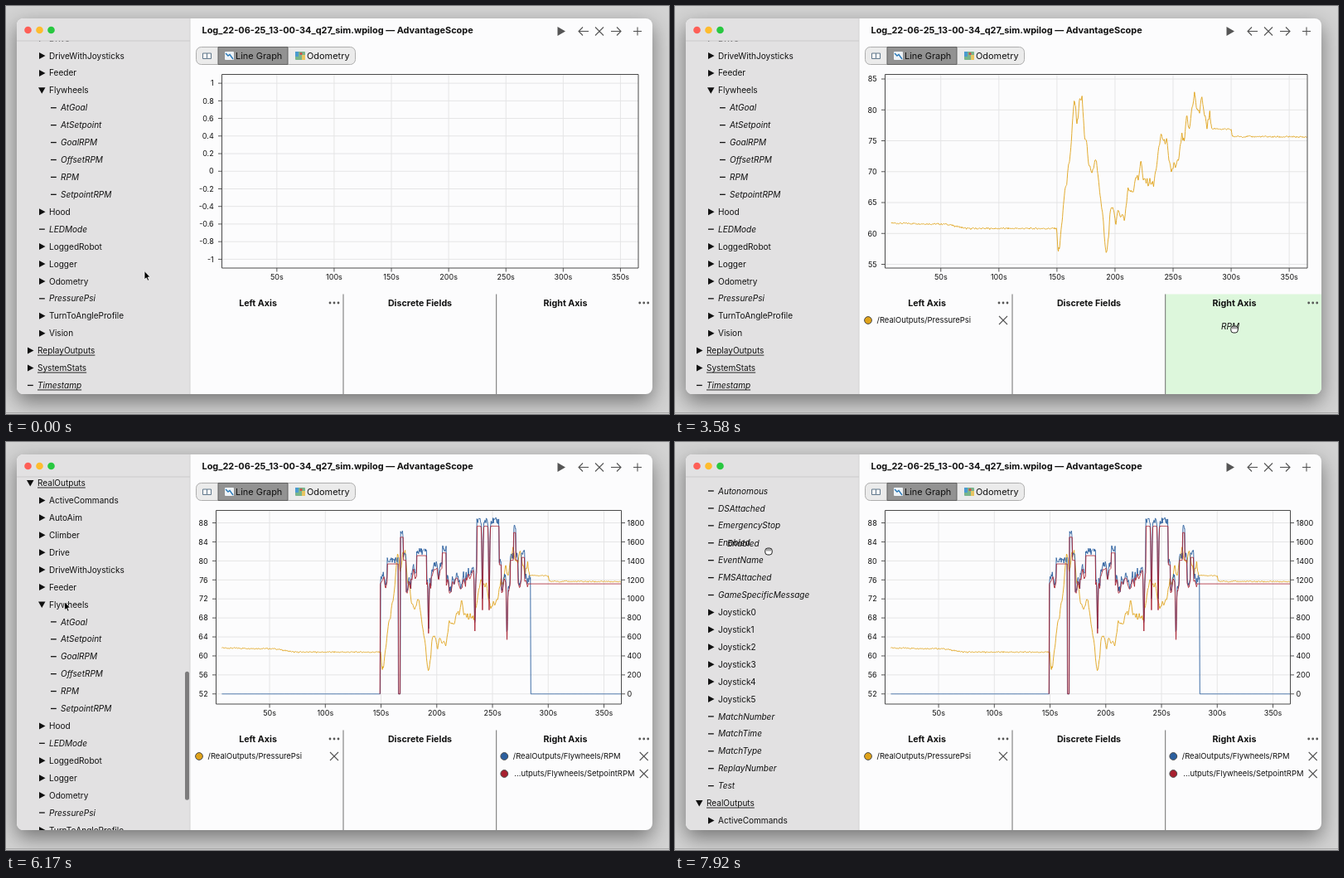
Recreate the animation shown at these times as an HTML page with a canvas. Size 800 px wide and 492 px high, loop 8000 ms.

```html
<!DOCTYPE html>
<html lang="en">
<head>
<meta charset="utf-8">
<title>Log viewer</title>
<style>
  html, body { margin: 0; height: 100%; overflow: hidden; background: #d3d3d3; }
  canvas { display: block; }
</style>
</head>
<body>
<canvas id="stage" width="800" height="492"></canvas>
<script>
const ctx = document.getElementById('stage').getContext('2d');
const LOOP = 8000, ROW = 20.92;
const YELLOW = '#e0a31a', BLUE = '#2b5f9f', RED = '#a8202f', INK = '#111', GRAY = '#555';

// Sidebar entries: indent level, then > closed, v open, - leaf
const tree = `1-Autonomous 1-DSAttached 1-EmergencyStop 1-Enabled 1-EventName 1-FMSAttached
1-GameSpecificMessage 1>Joystick0 1>Joystick1 1>Joystick2 1>Joystick3 1>Joystick4 1>Joystick5
1-MatchNumber 1-MatchTime 1-MatchType 1-ReplayNumber 1-Test 0vRealOutputs 1>ActiveCommands
1>AutoAim 1>Climber 1>Drive 1>DriveWithJoysticks 1>Feeder 1vFlywheels 2-AtGoal 2-AtSetpoint
2-GoalRPM 2-OffsetRPM 2-RPM 2-SetpointRPM 1>Hood 1-LEDMode 1>LoggedRobot 1>Logger 1>Odometry
1-PressurePsi 1>TurnToAngleProfile 1>Vision 0>ReplayOutputs 0>SystemStats 0-Timestamp`
  .split(/\s+/).map(s => ({ level: +s[0], kind: s[1], name: s.slice(2) }));

// Pointer moves; a move with a drag carries that entry until it is dropped
const moves = [
  { from: 420, to: 1000, x: 84, y: 352 },
  { from: 1220, to: 1820, x: 305, y: 386, drag: 'PressurePsi', drop: 1960 },
  { from: 2040, to: 2400, x: 86, y: 217 },
  { from: 2480, to: 2650, x: 81, y: 208.4 },
  { from: 2880, to: 3500, x: 674, y: 388, drag: 'RPM', drop: 3660 },
  { from: 3720, to: 4300, x: 89, y: 224 },
  { from: 4540, to: 5240, x: 670, y: 393, drag: 'SetpointRPM', drop: 5410, arrow: true },
  { from: 5430, to: 5860, x: 70.5, y: 193 },
  { from: 7050, to: 7420, x: 101, y: 129.6 },
  { from: 7620, to: 7900, x: 112, y: 130, drag: 'Enabled', drop: LOOP }];

function ramp(t, from, to) {
  const u = Math.min(1, Math.max(0, (t - from) / (to - from)));
  return u * u * (3 - 2 * u);
}
function cursorAt(t) {
  let x = 167, y = 320;
  for (const m of moves) {
    const u = ramp(t, m.from, m.to);
    x += (m.x - x) * u;
    y += (m.y - y) * u;
  }
  return [x, y];
}
const scrollAt = t => -421.2 + 476.2 * ramp(t, 5880, 6900) + 4 * ramp(t, 7080, 7300);

// Signals over seconds: a few key points roughened by seeded noise
const hash = i => { const s = Math.sin(i * 12.9898) * 43758.5453; return s - Math.floor(s) - 0.5; };
function grain(x) {
  const i = Math.floor(x), u = x - i;
  return hash(i) * (1 - u) + hash(i + 1) * u;
}
function sample(valueAt, from, to) {
  const out = [];
  for (let t = from; t <= to; t += 0.4) out.push([t, valueAt(t)]);
  return out;
}
const pressureKeys = [[0, 61.7], [55, 61.5], [72, 60.8], [149.8, 60.8], [151, 56.7], [165, 81.5],
  [168, 79], [171.6, 83.5], [177, 70.5], [184, 73.5], [192.3, 57], [199, 64], [208, 61], [214, 69],
  [226, 70.5], [231, 66.5], [242, 76], [252, 70.5], [272, 82.5], [283, 77], [300, 76.8],
  [301, 75.7], [370, 75.6]];
function pressureAt(t) {
  const i = pressureKeys.findIndex(k => k[0] > t);
  const [t0, v0] = pressureKeys[i - 1], [t1, v1] = pressureKeys[i];
  const busy = t > 152 && t < 283;
  const rough = busy ? 5 * grain(t / 2.2) + 1.5 * grain(t * 1.3) : 0.3 * grain(t * 2);
  return v0 + (v1 - v0) * (t - t0) / (t1 - t0) + rough;
}
// Wheel speed holds each level from its start time and sags briefly at each shot
const speedLevels = [[0, 0], [149.4, 1190], [155.5, 1410], [165.6, 0], [167.4, 1700], [170, 1450],
  [172.5, 1180], [177, 1290], [182, 1500], [191, 1200], [195, 1300], [205, 1530], [208.5, 1180],
  [226, 1300], [236, 1820], [256, 1400], [258, 1180], [266, 1450], [269, 1750], [271, 1450],
  [273, 1180], [276, 1480], [279, 1220], [284.4, 0]];
const shots = [192.6, 234.2, 241, 247, 263];
function speedAt(t, jitter) {
  const level = speedLevels.filter(k => k[0] <= t).pop()[1];
  if (!level) return 0;
  const sag = shots.reduce((sum, s) => sum + 0.5 * Math.exp(-(((t - s) / 0.6) ** 2)), 0);
  const wander = level < 1400 ? 180 * grain(t / 1.4) : 0;
  return level * (1 - sag) + wander + jitter * grain(t * 2.5);
}
const pressure = sample(pressureAt, 7.2, 366);
const rpm = sample(t => speedAt(t, 70), 7.2, 366);
const setpoint = sample(t => t < 282.5 ? speedAt(t, 0) * 0.97 : 1158, 149, 366);

// One layout per number of plotted fields
const psiAxis = { min: 54.4, max: 85.74, step: 5 };
const charts = [
  { left: 260.5, right: 763, y: { min: -1.1, max: 1.1, step: 0.2 } },
  { left: 253.5, right: 763, y: psiAxis },
  { left: 253.5, right: 735.5, y: psiAxis, y2: { min: -1060, max: 2074, step: 500 } },
  { left: 253.5, right: 742.5, y: { min: 49.87, max: 90.62, step: 4 },
    y2: { min: -106.6, max: 1930.9, step: 200 } }];
const TOP = 82.5, BOTTOM = 316, START = 2, END = 365.6;

function text(str, x, y, size, { style = '', align = 'left' } = {}) {
  ctx.font = `${style} ${size}px Inter, sans-serif`;
  ctx.textAlign = align;
  ctx.fillStyle = INK;
  ctx.fillText(str, x, y + size * 0.36);
}
function paint(fill, stroke, width = 1) {
  ctx.lineWidth = width;
  if (fill) { ctx.fillStyle = fill; ctx.fill(); }
  if (stroke) { ctx.strokeStyle = stroke; ctx.stroke(); }
}
function path(points, { fill, stroke, width, close }) {
  ctx.beginPath();
  points.forEach(([x, y]) => ctx.lineTo(x, y));
  if (close) ctx.closePath();
  paint(fill, stroke, width);
}
const line = (x0, y0, x1, y1, stroke, width) => path([[x0, y0], [x1, y1]], { stroke, width });
function rect(x, y, w, h, radius, fill, stroke) {
  ctx.beginPath();
  ctx.roundRect(x, y, w, h, radius);
  paint(fill, stroke);
}
const dot = (x, y, r, fill, stroke) => rect(x - r, y - r, 2 * r, 2 * r, r, fill, stroke);
function cross(x, y) {
  line(x - 5, y - 5, x + 5, y + 5, GRAY, 1.1);
  line(x - 5, y + 5, x + 5, y - 5, GRAY, 1.1);
}
function clipped(x, y, w, h, drawInside) {
  ctx.save();
  ctx.beginPath();
  ctx.rect(x, y, w, h);
  ctx.clip();
  drawInside();
  ctx.restore();
}

function drawWindow() {
  ctx.fillStyle = '#d3d3d3';
  ctx.fillRect(0, 0, 800, 492);
  ctx.save();
  ctx.shadowColor = 'rgba(0,0,0,.45)';
  ctx.shadowBlur = 24;
  ctx.shadowOffsetY = 9;
  rect(13, 15, 767, 453, 8, '#fcfcfd');
  ctx.restore();
  line(0, 490.5, 800, 490.5, '#a9a9a9');
  rect(13, 15, 209, 453, [8, 0, 0, 8], '#e2e1e2');
  line(222, 15, 222, 468, '#d2d1d2');
}

function drawTree(offset, scrollbar) {
  clipped(13, 42, 209, 426, () => {
    tree.forEach(({ level, kind, name }, i) => {
      const y = offset + i * ROW, x = 26 + 14 * level;
      if (kind === '>') path([[x, y - 4], [x + 7.5, y], [x, y + 4]], { fill: INK });
      if (kind === 'v') path([[x - 1, y - 3.5], [x + 7.5, y - 3.5], [x + 3.25, y + 4]], { fill: INK });
      if (kind === '-') line(x, y, x + 6.8, y, INK, 1.3);
      text(name, x + 12, y, 10.05, { style: kind === '-' ? 'italic' : '' });
      if (level === 0) line(x + 12, y + 5.5, x + 12 + ctx.measureText(name).width, y + 5.5, INK, 0.9);
    });
    if (scrollbar) rect(216, 155.4 - 0.371 * offset, 5, 155, 2.5, '#7d7c7d');
  });
  line(13, 42, 222, 42, '#cbcacb');
  ['#fe5f57', '#febc2e', '#28c840'].forEach((c, i) => dot(26.5 + 14 * i, 29, 4.3, c));
}

function drawToolbar() {
  text('Log_22-06-25_13-00-34_q27_sim.wpilog — AdvantageScope', 236.5, 29, 10.93, { style: 'bold' });
  path([[665.5, 25], [675, 30.5], [665.5, 36]], { fill: GRAY });
  [[697, -1], [736, 1]].forEach(([x, d]) => {
    line(x - 6, 30.5, x + 6, 30.5, GRAY, 1.1);
    path([[x + d, 25.5], [x + 6 * d, 30.5], [x + d, 35.5]], { stroke: GRAY, width: 1.1 });
  });
  cross(716, 30.5);
  line(757, 30.5, 767, 30.5, GRAY, 1.1);
  line(762, 25.5, 762, 35.5, GRAY, 1.1);

  rect(229.5, 49.5, 192, 21, 6, '#ebebeb', '#aeaeae');
  rect(256, 49.5, 84, 21, 0, '#929292', '#606060');
  rect(237.5, 57, 5, 6.5, 0, '#f6f6f6', '#61788c');
  rect(242.5, 57, 5, 6.5, 0, '#f6f6f6', '#61788c');
  rect(264, 55, 11, 10, 1, '#eef3f7');
  path([[265, 57], [268, 60], [270, 58.5], [274, 64]], { stroke: '#2878b8', width: 1.4 });
  rect(349, 55, 12, 10, 1, '#79b58b');
  rect(349, 55, 4, 6, 0, '#4a9bd0');
  rect(357, 59, 4, 6, 0, '#e8c562');
  dot(356, 57.5, 1.5, '#d34b42');
  text('Line Graph', 277, 60, 10.95);
  text('Odometry', 363, 60, 10.95);
}

function drawChart(fieldCount) {
  const { left, right, y, y2 } = charts[fieldCount];
  const xOf = s => left + (s - START) / (END - START) * (right - left);
  const yOf = (axis, v) => TOP + (axis.max - v) / (axis.max - axis.min) * (BOTTOM - TOP);
  const eachTick = (axis, fn) => {
    for (let i = Math.ceil(axis.min / axis.step); i * axis.step < axis.max; i++) {
      fn(String(+(i * axis.step).toFixed(1)), yOf(axis, i * axis.step));
    }
  };
  for (let s = 50; s <= 350; s += 50) {
    const x = xOf(s);
    line(x, TOP, x, BOTTOM, '#e5e5e6');
    line(x, BOTTOM, x, BOTTOM + 4.5, GRAY);
    text(s + 's', x, 326.5, 9, { align: 'center' });
  }
  eachTick(y, (label, ty) => {
    line(left, ty, right, ty, '#e5e5e6');
    line(left - 4.5, ty, left, ty, GRAY);
    text(label, left - 9.8, ty, 9, { align: 'right' });
  });
  if (y2) eachTick(y2, (label, ty) => {
    line(right, ty, right + 4.5, ty, GRAY);
    text(label, right + 7, ty, 9.1);
  });
  const plot = (data, axis, stroke) =>
    path(data.map(([s, v]) => [xOf(s), yOf(axis, v)]), { stroke, width: 0.9 });
  clipped(left, TOP, right - left, BOTTOM - TOP, () => {
    ctx.lineJoin = 'round';
    if (fieldCount > 0) plot(pressure, y, YELLOW);
    if (fieldCount > 1) plot(rpm, y2, BLUE);
    if (fieldCount > 2) plot(setpoint, y2, RED);
  });
  rect(left, TOP, right - left, BOTTOM - TOP, 0, null, '#4a4a4a');
}

function drawFields(fieldCount, highlight) {
  const edges = [222, 407, 591.7, 780];
  if (highlight >= 0) {
    const x = edges[highlight];
    rect(x, 347.5, edges[highlight + 1] - x, 120.5, highlight === 2 ? [0, 0, 8, 0] : 0, '#ddf7dc');
  }
  edges.slice(1, 3).forEach(x => line(x, 347.5, x, 468, '#6e6e6e'));
  [['Left Axis', 304], ['Discrete Fields', 499.5], ['Right Axis', 675]].forEach(([name, x]) =>
    text(name, x, 358, 10.7, { style: 'bold', align: 'center' }));
  [396, 769.7].forEach(x => [-5, 0, 5].forEach(d => dot(x + d, 358, 1.4, GRAY)));
  const field = (name, x, y, color, indent = 10.5) => {
    dot(x, y, 4.4, color, '#4b4b4b');
    text(name, x + indent, y, 9.43);
    cross(x < 400 ? 396 : 769.7, y);
  };
  if (fieldCount > 0) field('/RealOutputs/PressurePsi', 233, 379, YELLOW);
  if (fieldCount > 1) field('/RealOutputs/Flywheels/RPM', 601.3, 379, BLUE);
  if (fieldCount > 2) field('…utputs/Flywheels/SetpointRPM', 601.3, 400, RED, 12);
}

function drawCursor(x, y, hand) {
  ctx.save();
  ctx.translate(x, y);
  ctx.lineJoin = 'round';
  if (hand) {
    rect(-3.2, -2, 8.4, 8, 3, '#fff', '#222');
    [-1, 1, 3].forEach(fx => line(fx, -1.5, fx, 1.5, '#222', 0.8));
  } else {
    path([[0, -0.5], [0, 9.8], [2.3, 7.8], [4, 11.3], [5.7, 10.5], [4.1, 7.1], [7.1, 6.9]],
      { fill: '#000', stroke: '#fff', width: 0.8, close: true });
  }
  ctx.restore();
}

function draw(t) {
  const [x, y] = cursorAt(t), offset = scrollAt(t);
  const fieldCount = moves.filter(m => t >= m.drop).length;
  const move = moves.find(m => m.drag && t >= m.from && t < m.drop);
  const highlight = !move || y < 348 || x < 222 ? -1 : x < 407 ? 0 : x < 591.7 ? 1 : 2;
  drawWindow();
  drawTree(offset, t > 5880 && t < 7700);
  drawToolbar();
  drawChart(fieldCount);
  drawFields(fieldCount, highlight);
  if (move) {
    const [grabX, grabY] = cursorAt(move.from), row = tree.findIndex(r => r.name === move.drag);
    text(move.drag, 38 + 14 * tree[row].level + x - grabX, offset + row * ROW + y - grabY, 10.05,
      { style: 'italic' });
  }
  drawCursor(x, y, move && !move.arrow);
}

function frame() {
  draw(performance.now() % LOOP);
  requestAnimationFrame(frame);
}
frame();
</script>
</body>
</html>
```
